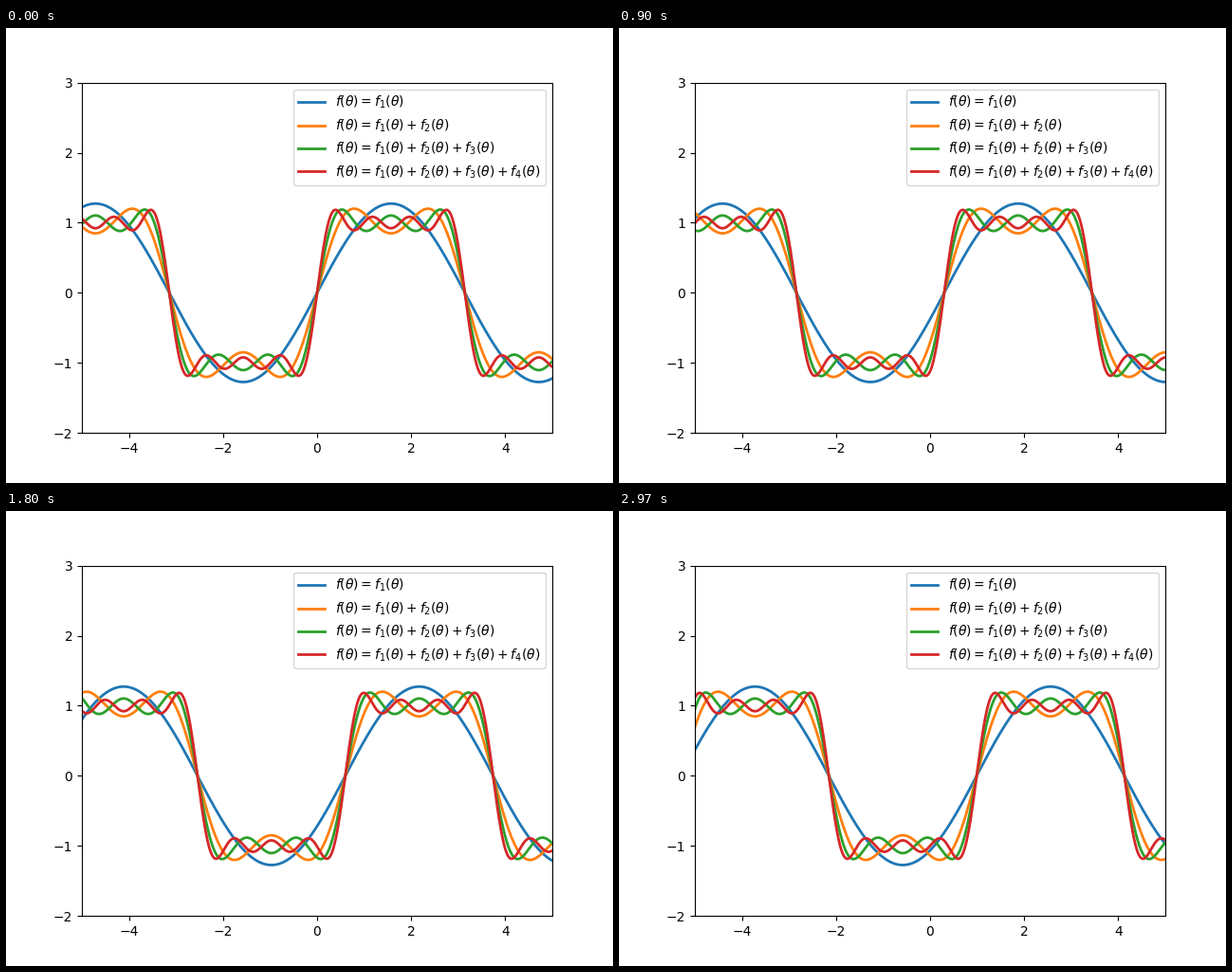
Animation of 640 by 480 pixels, one loop 3 s. Source, as a matplotlib script:

```python
import numpy as np
import matplotlib.pyplot as plt
from matplotlib.animation import FuncAnimation

FRAMES = 100
INTERVAL = 30  # ms
SPEED = 0.01   # shift in theta per frame
TERMS = 4

theta = np.linspace(-5, 5, 1000)


def square_wave(x, terms):
    """Partial Fourier sum of a unit square wave."""
    odd = 2 * np.arange(terms)[:, None] + 1
    return (4 / np.pi * np.sin(odd * x) / odd).sum(axis=0)


def label(terms):
    parts = [rf"f_{k}(\theta)" for k in range(1, terms + 1)]
    return rf"$f(\theta) = {' + '.join(parts)}$"


fig, ax = plt.subplots(figsize=(6.4, 4.8), dpi=100)
ax.set_xlim(-5, 5)
ax.set_ylim(-2, 3)
ax.set_xticks(range(-4, 5, 2))
ax.set_yticks(range(-2, 4))

lines = [ax.plot(theta, square_wave(theta, n), lw=2, label=label(n))[0]
         for n in range(1, TERMS + 1)]
ax.legend(loc="upper right")


def update(frame):
    x = theta - SPEED * frame
    for n, line in enumerate(lines, 1):
        line.set_ydata(square_wave(x, n))
    return lines


anim = FuncAnimation(fig, update, frames=FRAMES, interval=INTERVAL,
                     repeat=True, repeat_delay=0, blit=False)
plt.show()
```
